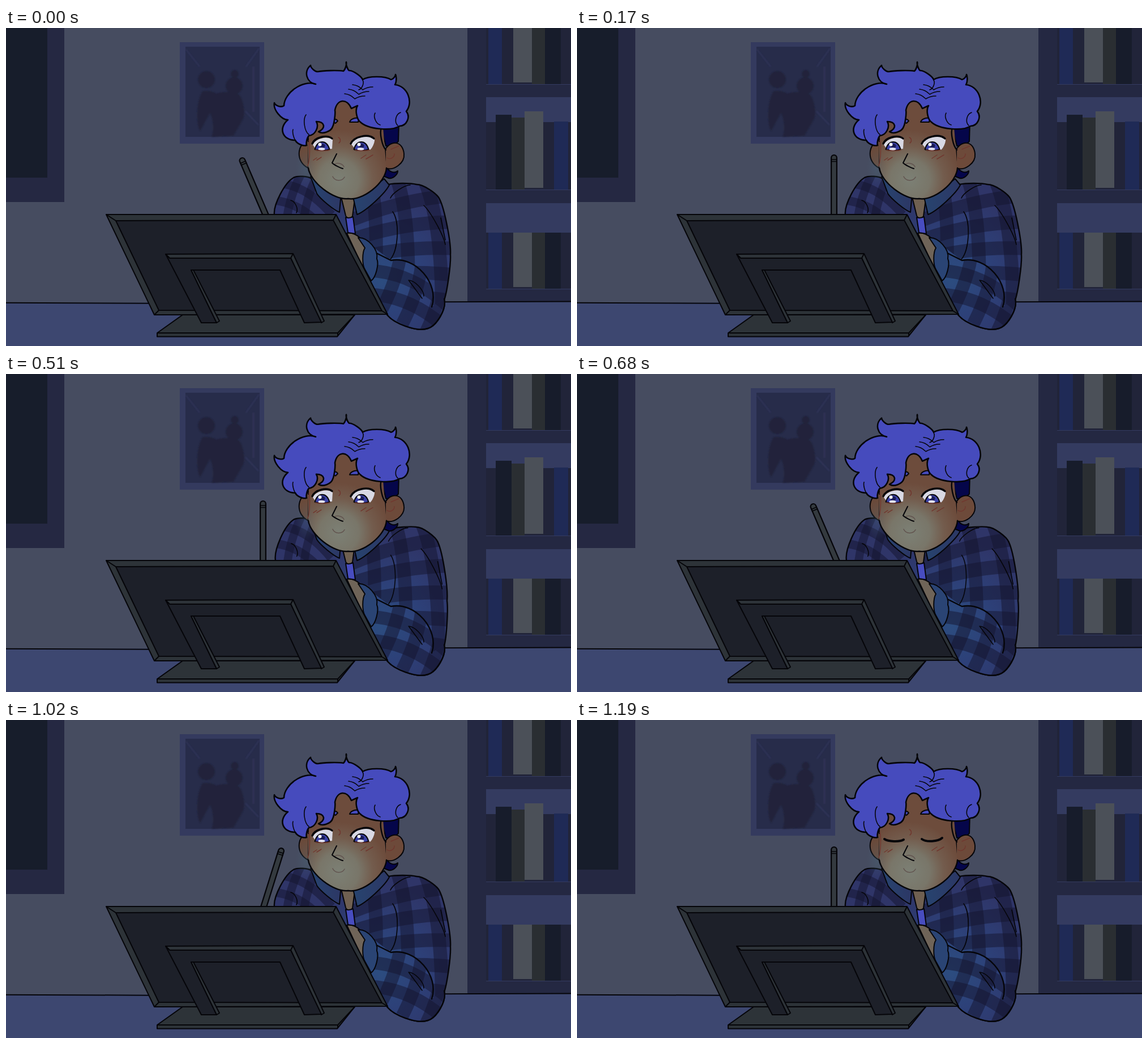
Write an HTML page that moves like this. It is 998 by 561 pixels and loops after 1360 ms.

```html
<!DOCTYPE html>
<html lang="en">
<head>
<meta charset="utf-8">
<title>Late night drawing</title>
<style>
  html, body { margin: 0; width: 100%; height: 100%; overflow: hidden; background: #464c60; }
  svg { display: block; width: 100%; height: 100%; }
  .ln { fill: none; stroke: #050509; stroke-width: 2.4; stroke-linecap: round; stroke-linejoin: round; }
  .thin { stroke-width: 1.6; }
  .lid { stroke-width: 3.4; }
  .ink { stroke: #050509; stroke-width: 2; stroke-linejoin: round; }
  .hair { fill: #464bbd; }
  .under { fill: #05064a; }
  .band { fill: none; stroke: #14152f; stroke-opacity: .5; }
  .red { fill: none; stroke: #70382f; stroke-width: 1.5; stroke-linecap: round; }
  .pale { stroke: #62544f; }
  .metal { fill: #2d3338; }
  .dark { fill: #1d2029; }
</style>
</head>
<body>
<svg viewBox="0 0 998 561" preserveAspectRatio="none">
  <defs>
    <radialGradient id="cloth" gradientUnits="userSpaceOnUse" cx="660" cy="440" r="150">
      <stop offset="0" stop-color="#2c4d80"/><stop offset=".5" stop-color="#2d4078"/>
      <stop offset="1" stop-color="#2f3568"/>
    </radialGradient>
    <radialGradient id="skin" gradientUnits="userSpaceOnUse" cx="588" cy="268" r="88">
      <stop offset="0" stop-color="#7c8075"/><stop offset=".4" stop-color="#797669"/>
      <stop offset=".68" stop-color="#735c4d"/><stop offset="1" stop-color="#6d4c3c"/>
    </radialGradient>
    <radialGradient id="halo">
      <stop offset="0" stop-color="#4a6a7a" stop-opacity=".3"/><stop offset="1" stop-color="#4a6a7a" stop-opacity="0"/>
    </radialGradient>
    <linearGradient id="collar">
      <stop offset="0" stop-color="#27446f"/><stop offset="1" stop-color="#2c3765"/>
    </linearGradient>
    <radialGradient id="teal" gradientUnits="userSpaceOnUse" r="1" gradientTransform="translate(652 462) rotate(62) scale(115 30)">
      <stop offset="0" stop-color="#41626a" stop-opacity=".45"/><stop offset="1" stop-color="#41626a" stop-opacity="0"/>
    </radialGradient>
    <filter id="soft"><feGaussianBlur stdDeviation="1.3"/></filter>
    <clipPath id="inTorso"><path class="torso"/></clipPath>
    <clipPath id="inArm"><use href="#arm"/></clipPath>
  </defs>

  <!-- room -->
  <path fill="#252842" d="M0 0H103V307H0z"/>
  <path fill="#171d2b" d="M0 0H73V264H0z"/>
  <path fill="#343a5e" d="M307 25H456V204H307z"/>
  <path fill="#272c4a" d="M317 33H448V192H317z"/>
  <g filter="url(#soft)">
    <path fill="none" stroke="#30365a" stroke-width="2" d="M318 38L342 68M447 36L424 68M437 68V148M423 147L446 171"/>
    <g fill="#20243a">
      <circle cx="354" cy="91" r="15"/><circle cx="403" cy="102" r="15"/><circle cx="404" cy="81" r="7"/>
      <path data-s="343,182 347,112,.1 372,116,.1 412,118,.1 419,160,.1 402,190 363,192 360,150,-.1"/>
    </g>
  </g>
  <path fill="#242842" d="M815 0H998V483H815z"/>
  <g id="shelves"></g>
  <path fill="#3d4770" d="M0 485L998 482V561H0z"/>
  <path class="ln" style="stroke-width:2" d="M0 484.7L260 485.7M770 483.3L998 482.5"/>

  <g id="pen" fill="none" stroke="#050509" stroke-linecap="round">
    <path stroke-width="12" d="M0 0V125"/>
    <path stroke="#343a3f" stroke-width="7.5" d="M0 0V125"/>
    <path stroke-width="1.6" d="M-5 3H5M-5 6.5H5"/>
  </g>

  <!-- body -->
  <path class="torso" fill="url(#cloth)"/>
  <g clip-path="url(#inTorso)">
    <g id="plaid">
      <path class="band" stroke-width="24" id="warp"/>
      <path class="band" stroke-width="24" id="weft"/>
      <path class="band" stroke-width="15" id="sleeveWarp"/>
      <path class="band" stroke-width="15" id="sleeveWeft"/>
      <path class="ln thin" data-o="679,300 714,277,.1 | 683,324 679,408,.12 | 738,313 776,382,.05 | 768,335 776,374 | 503,304 513,326,.2"/>
    </g>
  </g>
  <path class="torso ln"/>

  <!-- folded arm -->
  <path id="arm" fill="url(#cloth)" data-s="640,380 680,410 752,492,.26 774,478 745,530,.15 672,504,.12 630,440"/>
  <g class="band" stroke-width="23" clip-path="url(#inArm)">
    <path id="cross"/><path id="along"/>
  </g>
  <path class="ln" data-o="774,478 745,530,.15 672,504,.12 | 654,397 680,410 752,492,.26"/>
  <path class="ln thin" data-o="711,445 738,473,.15 | 712,446 735,477"/>
  <path class="ink" fill="#6f6458" data-s="602,362 637,393,.2 630,422,.15"/>
  <path class="ink" fill="#2a4474" data-s="622,370 655,407,.2 645,446,.12 634,426 634,388,.1"/>

  <!-- neck and collar -->
  <path class="ink" fill="#6f6051" data-s="592,298 600,331 612,332,-.3 616,302"/>
  <path class="ink" fill="#484dc0" data-s="600,334 613,333,-.1 617,363 604,361"/>
  <path class="ink" fill="url(#collar)" data-s="538,262 549,292 589,325,-.05 591,302 590,280"/>
  <path class="ink" fill="url(#collar)" data-s="613,298 620,329 677,277,-.06 668,266 650,280"/>

  <g id="head">
    <path class="ink under" data-s="673,243 692,252,-.3 676,265,.2 666,261"/>
    <path class="ink under" data-s="660,165 671,208 693,200,-.1 694,165"/>
    <path class="ink" fill="#6a4a3a" data-s="535,196 534,247,-.33"/>
    <path class="ink" fill="#6d4a3a" data-s="670,214 703,222,.45 670,247,.25"/>
    <path fill="url(#skin)" data-s="534,180 534,246 604,301,-.15 672,247,-.17 664,150 600,120 560,140"/>
    <ellipse cx="530" cy="247" rx="18" ry="36" fill="url(#halo)"/>
    <path class="ln" data-o="534,247 604,301,-.15 672,247,-.17 | 533,184 534,200 | 663,176 671,215,-.1"/>
    <path class="red" data-o="535,198 533,243,.05 | 694,208 680,214 | 686,222 673,229,.3 | 587,193 588,203,.3 | 543,233 549,229 | 549,233 557,228 | 627,230 636,224 | 636,231 648,224"/>
    <path class="red pale" data-o="581,240 597,245,.2 | 577,262 598,263,-.3"/>
    <path class="ln" style="stroke-width:2" data-o="584,222 576,238 595,248,-.05"/>
    <path class="ink hair" data-s="607,166 623,160,.2 622,166"/>
    <path class="ink hair" data-s="578,166 586,164,.5 582,168"/>

    <g id="open">
      <path fill="#d9d9e4" data-s="542,206 577,197,.2 576,213 549,216"/>
      <path fill="#d9d9e4" data-s="609,204 651,196,.22 643,215,.1 619,216"/>
      <g id="iris" transform="translate(558.5 209)">
        <path class="ink" fill="#3c42a7" data-s="-13,5,.08 13,5,.5"/>
        <ellipse cy="-1" rx="5" ry="4" fill="#191b55"/>
        <circle cx="-4" cy="-3.5" r="3" fill="#f1f1f8"/>
        <ellipse cx="-1" cy="4.5" rx="6" ry="2.4" fill="#e3e4f4"/>
      </g>
      <use href="#iris" x="69"/>
      <path class="ln lid" data-o="541,204 576,195,.2 | 609,204 650,195,.2"/>
      <path class="red" data-o="547,215 572,215,-.06 | 617,215 642,215,-.06"/>
    </g>
    <path id="shut" class="ln" style="stroke-width:4" data-o="543,210 577,211,-.1 | 609,210 645,208,-.13"/>

    <path class="ink hair" style="stroke-width:2.6" data-s="538,66 551,77,-.15 596,76,.03 601,60,-.1 606,75,-.1 630,91,.1 680,91,.1 688,82,-.15 687,100,.1 707,147,.28 695,173,.3 626,166,.12 621,137,.15 610,142 581,145,-.5 577,174,.05 552,183,.2 548,165,-.6 535,190,.25 531,207,-.1 511,198,.15 498,162,.42 474,132,.18 491,137,-.2 547,99,.21 538,66,.33"/>
    <path class="ln thin" data-o="507,179 512,199,-.1 | 530,153 535,188,-.15 | 652,150 661,171,-.2 | 697,149 692,172,-.25 | 630,92 623,109,.2"/>
    <path class="ln thin" id="strands"/>
  </g>

  <!-- drawing screen -->
  <g class="ink">
    <path class="metal" d="M312 506L267 538V544.5H585L616 506z"/>
    <path fill="none" d="M267 538H586L616 506M586 538V544"/>
    <path class="metal" d="M177 329H583L674 505L262 506z"/>
    <path class="dark" d="M194 340L578 339L664 499L270 498z"/>
    <path stroke="none" fill="url(#teal)" d="M178 330H582L672 504H262z"/>
    <path d="M177 329L194 340M583 329L578 339M664 499L674 505M270 498L262 506"/>
    <path class="metal" d="M282 399L507 398L562 517L557 520L503 406H289z"/>
    <path class="dark" d="M282 399L289 406H503L557 519L527 520L484 427H327L372 520H345z"/>
    <path class="metal" d="M327 427H331L377 517L372 520z"/>
    <path d="M503 406L507 398"/>
  </g>
</svg>
<script>
const STEP = 170, COUNT = 8;
const $ = id => document.getElementById(id);
const setPath = (id, d) => $(id).setAttribute('d', d);
const repeat = (n, f) => Array.from({ length: n }, (_, i) => f(i)).join('');

// Chain of arcs: "x,y,bulge" ends each arc; the bulge is a share of its chord.
function arcs(text, closed) {
  const pts = text.trim().split(/\s+/).map(p => p.split(',').map(Number));
  const ends = closed ? [...pts.slice(1), pts[0]] : pts.slice(1);
  let [x, y] = pts[0], d = `M${x} ${y}`;
  for (const [u, v, bulge = 0] of ends) {
    const dx = u - x, dy = v - y, k = bulge * 4 / 3, q = 0.2;
    d += `C${x + q * dx + k * dy} ${y + q * dy - k * dx} ${u - q * dx + k * dy} ${v - q * dy - k * dx} ${u} ${v}`;
    [x, y] = [u, v];
  }
  return closed ? d + 'z' : d;
}
document.querySelectorAll('[data-s]').forEach(el => el.setAttribute('d', arcs(el.dataset.s, true)));
document.querySelectorAll('[data-o]').forEach(el =>
  el.setAttribute('d', el.dataset.o.split('|').map(s => arcs(s)).join('')));

// Shirt checks: fans of curved bands.
setPath('warp', repeat(3, i => `M${642 + 47 * i} 262Q${662 + 54 * i} 335 ${648 + 61 * i} 500`));
setPath('weft', repeat(5, i => `M612 ${338 + 35 * i}Q700 ${302 + 41 * i} 795 ${295 + 47 * i}`));
setPath('sleeveWarp', repeat(2, i => `M${524 + 30 * i} 252q-22 40 -28 84`));
setPath('sleeveWeft', repeat(2, i => `M${483 - 9 * i} ${274 + 30 * i}q50 5 92 55`));
setPath('cross', repeat(3, i => `M${698 + 36 * i} ${392 + 26 * i}q-6 50 -34 104`));
setPath('along', repeat(2, i => `M640 ${428 + 42 * i}q75 2 140 62`));
setPath('strands', repeat(3, i =>
  `M${598 + 7 * i} ${116 - 8 * i}q10 1 17 8M${648 - 7 * i} ${104 + 8 * i}q-10 0 -18 5`));

// Books stand side by side: width, drop below the tallest, colour.
const GREY = '#4b5058', BLUE = '#1f2a56', NAVY = '#171c2b', OLIVE = '#2a2e32', DUSK = '#212439';
const rect = (x, y, w, h, fill) => `<rect x="${x}" y="${y}" width="${w}" height="${h}" fill="${fill}"/>`;
const even = [[4, 0, DUSK], [24, 0, BLUE], [20, 0, DUSK], [33, 0, GREY], [23, 0, OLIVE], [28, 0, NAVY], [18, 0, DUSK]];
const mixed = [[17, 19, DUSK], [28, 6, NAVY], [23, 11, OLIVE], [33, 0, GREY], [19, 19, DUSK], [25, 18, BLUE], [5, 19, DUSK]];
function shelf(top, bottom, tallest, books) {
  let x = 848, out = rect(x, top, 150, bottom - top, '#343b60');
  for (const [w, drop, fill] of books) {
    const y = tallest + drop;
    out += rect(x, y, w, bottom - 1 - y, DUSK) + rect(x, y, w, bottom - (fill === GREY ? 4 : 1) - y, fill);
    x += w;
  }
  return out;
}
$('shelves').innerHTML = shelf(-20, 100, -20, even) + shelf(122, 286, 147, mixed) + shelf(309, 461, 361, even);

// Leaning in lifts the shoulders and draws the elbow inwards.
const torso = lean => arcs(`${474 + 2 * lean},329 508,${264 - 7 * lean},.1 540,${266 - 8 * lean},.1 604,298
  676,${276 - 2 * lean} 725,${276 - 6 * lean},.04 ${766 - 3 * lean},${302 - 5 * lean},.1
  ${785 - 6 * lean},400,.04 774,480,.03 745,530,.15 672,504,.12 580,340 474,340`, true);

const swing = [[417.5, 234, -23.3], [454, 229, 0], [486, 231, 17.4], [454, 229, 0]];

function draw(step) {
  const lean = step === 3 || step === 4 ? 1 : 0;
  const blink = step === 7;
  const [x, y, tilt] = swing[step % 4];
  $('pen').setAttribute('transform', `translate(${x} ${y}) rotate(${tilt})`);
  $('head').setAttribute('transform', `translate(0 ${11.7 * lean})`);
  $('plaid').setAttribute('transform',
    `translate(540 500) scale(${1 - .024 * lean} ${1 + .025 * lean}) translate(-540 -500)`);
  document.querySelectorAll('.torso').forEach(el => el.setAttribute('d', torso(lean)));
  $('open').style.display = blink ? 'none' : '';
  $('shut').style.display = blink ? '' : 'none';
}

let shown = -1;
const begin = performance.now();
function tick() {
  const step = Math.floor((performance.now() - begin) / STEP) % COUNT;
  if (step !== shown) draw(shown = step);
  requestAnimationFrame(tick);
}
tick();
</script>
</body>
</html>
```
